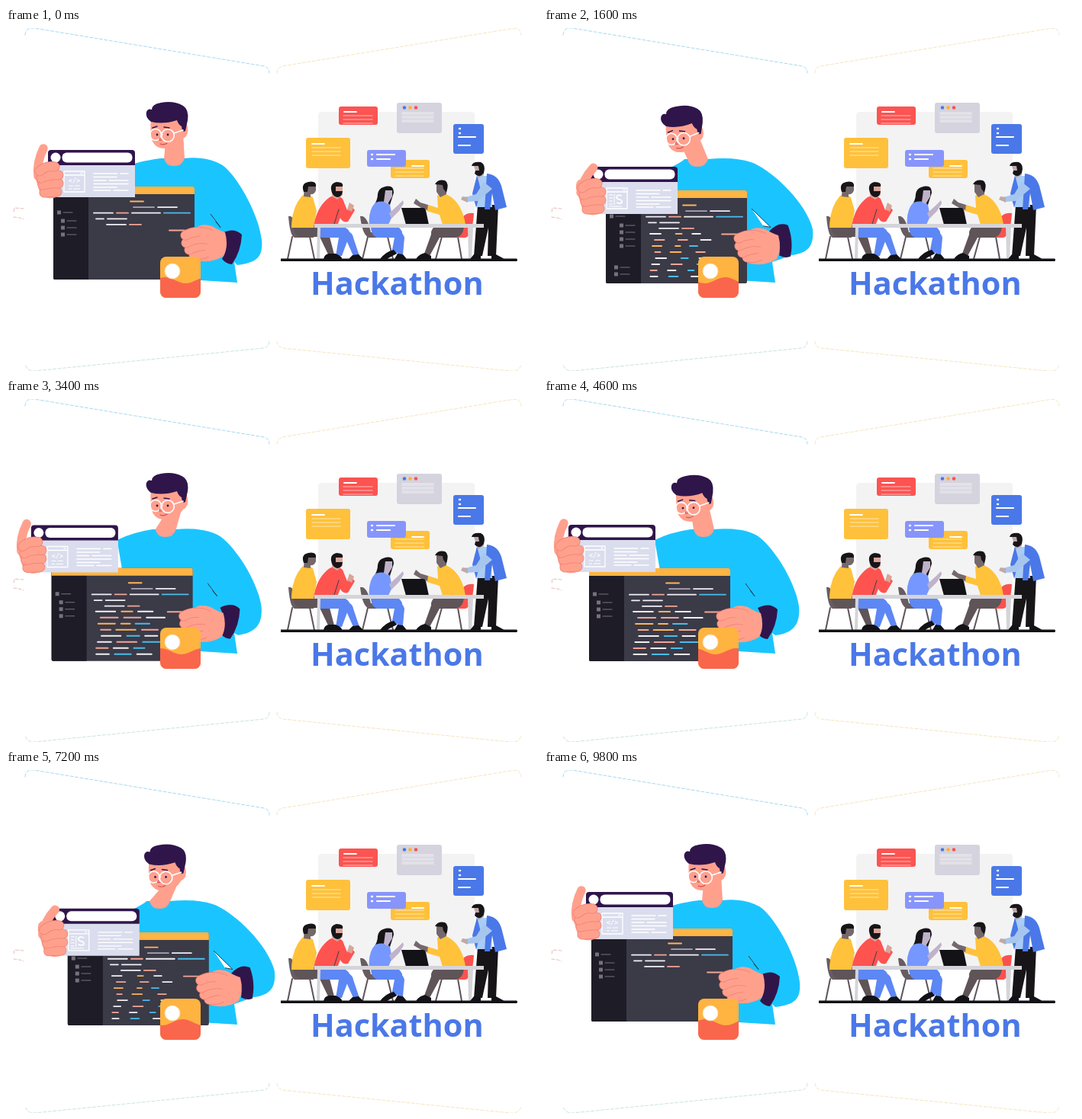
Write an HTML page that moves like this. It is 697 px wide and 450 px high and loops after 9860 ms.

```html
<!DOCTYPE html>
<html lang="en">
<head>
<meta charset="utf-8">
<title>Hackathon</title>
<style>
  html, body { margin: 0; width: 100%; height: 100%; overflow: hidden; background: #fff; }
  svg { display: block; width: 697px; height: 450px; }
  .line { fill: none; stroke-linecap: round; stroke-linejoin: round; }
  .skin { fill: #ffa08d; }
  .ink { fill: #30154b; }
  .finger { stroke: #ffa08d; stroke-width: 11.5; }
  .edge { stroke: #ed7f70; stroke-width: 13; }
</style>
</head>
<body>
<svg viewBox="0 0 697 450">
  <g class="line" stroke-width=".8" stroke-dasharray="4 2.5">
    <path stroke="#8fd0ec" d="M25 9Q26-1 36 0L338 50Q345 52 345 59"/>
    <path stroke="#bcdcd8" d="M345 411Q345 419 337 420L37 450Q27 450 25 441"/>
    <path stroke="#f2dfae" d="M355 59Q355 52 362 50L661 1Q674-2 675 9M355 411Q355 418 363 420L661 450Q673 451 675 441"/>
    <path stroke="#e3aaa8" d="M23 237L11 236 10 243M10 248L18 249 23 251"/>
  </g>

  <g id="man">
    <path id="body" fill="#1ac5ff"/>
    <path id="crease" fill="#fff" stroke="#173a55" stroke-linejoin="round"/>
    <path id="neck" class="skin"/>
    <g id="head">
      <path class="skin" d="M190 118Q188 138 192 149Q197 159 210 158Q225 157 232 145Q240 141 238 130L232 114Z"/>
      <path class="ink" d="M190 123Q182 117 184 110Q186 105 191 107Q191 100 203 98Q220 95 232 102Q240 107 238 121L235 135Q231 138 230 129Q226 127 224 121Q206 127 190 123Z"/>
      <path class="line" stroke="#30154b" stroke-width="1.5" d="M192 131l6-2M207 130l7 1"/>
      <g class="line" stroke="#fff" stroke-width="1.6">
        <circle cx="196" cy="140" r="7.5"/><circle cx="212" cy="141" r="8.3"/>
        <path d="M203 140h2M220 138L232 134"/>
      </g>
      <circle class="ink" cx="198" cy="140" r="1.4"/><circle class="ink" cx="212" cy="140" r="1.4"/>
      <path class="line" stroke="#d44f55" stroke-width="1.2" d="M202 144l-1 3 3 0M202 152q5 2 9-1"/>
    </g>

    <g id="editor">
      <rect width="185" height="122" rx="2" fill="#3b3a47"/>
      <path fill="#1e1c26" d="M0 0H46V122H2Q0 122 0 120Z"/>
      <path fill="#ffb443" d="M0 10V2Q0 0 2 0H183Q185 0 185 2V10Z"/>
      <g id="files"></g>
      <g id="tree"></g>
      <g id="code"></g>
    </g>

    <path id="cuff" class="ink" d="M283 269Q299 261 309 271Q308 293 296 310Q289 310 283 303Q293 288 283 269Z"/>
    <g id="hand">
      <path class="skin" d="M246 264Q256 255 270 260Q280 266 287 268Q292 286 285 299Q270 309 250 305Q238 300 238 284Z"/>
      <g id="rightFingers" class="line"></g>
    </g>

    <clipPath id="tile"><rect x="202" y="300" width="53" height="54" rx="8"/></clipPath>
    <g clip-path="url(#tile)">
      <rect x="202" y="300" width="53" height="54" fill="#ffb340"/>
      <path id="hill" fill="#f9664c"/>
      <circle cx="218" cy="319" r="10" fill="#fff" stroke="#f7ddb0"/>
    </g>

    <g id="card">
      <path fill="#dadded" d="M0 15H114V62H4Z"/>
      <path class="ink" d="M0 20V4Q0 0 4 0H110Q114 0 114 4V20Z"/>
      <circle cx="10" cy="10" r="6.5" fill="#fff"/>
      <rect x="18.5" y="3.5" width="92" height="13" rx="6" fill="#fff"/>
      <g class="line" stroke="#fff" stroke-width="1.3">
        <path d="M21 28H48V55H21ZM21 33H48M43 30.5h2"/>
        <path d="M60 31H91M95 31H105M60 35.5H90M60 40H76M80 40H105M60 44.5H105M60 49H90M60 53H82M86 53H105"/>
      </g>
      <g id="tag">
        <text x="34.5" y="43" text-anchor="middle" font-family="'DejaVu Sans Mono', monospace" font-size="8.5" font-weight="700" fill="#fff">&lt;/&gt;</text>
        <path stroke="#fff" d="M27 47h6M35 47h7M27 51h4M33 51h9"/>
      </g>
      <g id="alt" fill="none" stroke="#fff">
        <path d="M24 37h5M24 41h5M24 45h5M24 49h5M24 52h17M31 36v14"/>
        <path stroke-width="1.8" d="M41 38q-7-2-7 2q0 2 4 3q4 1 3 4q-2 2-7 0"/>
      </g>
      <path id="index" class="line finger" d="M-13 34Q-15 16 -6-2"/>
      <path class="skin" d="M-19 29Q-20 17-12 16L5 24 14 61Q-1 67-10 58Z"/>
      <g id="leftFingers" class="line"></g>
    </g>
  </g>

  <g id="team">
    <path fill="#f3f3f4" d="M414 110H610Q614 110 614 114V257H409V115Q409 110 414 110Z"/>
    <g id="notes"></g>
    <!-- chairs -->
    <path class="line" stroke="#5e545a" stroke-width="2" d="M375 274L369 303M398 274L404 303M474 274L467 303M500 274L507 303M571 274L563 303M592 274L597 303"/>
    <path fill="#675c62" d="M370 247Q378 245 381 268H403V275H378Q372 273 370 247ZM464 247Q473 245 478 268H501V275H476Q467 273 464 247Z"/>
    <path fill="#f9524e" d="M613 243Q598 241 593 259L571 270V275H602Q611 273 613 243Z"/>
    <!-- seated left, yellow -->
    <path fill="#5f5458" d="M377 259H408Q422 263 424 274L430 297 423 299 411 274H385Q376 271 377 259Z"/>
    <path fill="#ffc23a" d="M388 220Q394 217 402 222L407 240 403 262H374Q374 236 388 220Z"/>
    <path fill="#75686a" d="M391 205H406V213Q404 219 399 218V222L390 221Z"/>
    <path fill="#171518" d="M390 215Q386 204 396 202Q407 200 406 208H396L395 215Z"/>
    <!-- seated left, red -->
    <path fill="#5d87f4" d="M408 260H440Q452 264 450 272L440 299H432L436 275H412ZM436 262Q454 266 455 275L463 299H455L444 274Z"/>
    <path fill="#ff5350" d="M424 222Q433 217 441 224L447 239 452 233 457 239 448 254Q441 256 438 249L433 262H403Q406 235 424 222Z"/>
    <path fill="#d9a49a" d="M428 207H441V219L434 225 427 221ZM447 238L450 229 456 233 453 241Z"/>
    <path fill="#171518" d="M427 216Q423 204 433 202Q443 202 441 208H432L432 214H441Q440 222 434 222Q429 221 427 216Z"/>
    <path class="line" stroke="#413b48" d="M436 238L430 257"/>
    <!-- seated woman -->
    <path fill="#5d87f4" d="M478 258H508Q521 263 519 273L512 296H505L509 275H486Q477 271 478 258ZM502 262Q521 266 522 275L520 297H513L511 273Z"/>
    <path fill="#171518" d="M494 209Q508 204 508 216L503 232Q495 239 481 234Q487 226 487 218Q488 211 494 209Z"/>
    <path fill="#7597ff" d="M484 229Q497 225 503 232L506 247 500 260H476Q474 239 484 229Z"/>
    <path fill="#bfb2c9" d="M497 213H506V221L503 226 500 231 495 228ZM502 243L513 233 520 226 521 230 515 240 505 250Z"/>
    <!-- seated right, yellow -->
    <path fill="#5f5458" d="M600 258H566Q556 262 557 271L548 296 555 299 568 275H590Q600 272 600 258Z"/>
    <path fill="#ffc23a" d="M565 220Q574 215 582 221Q598 232 602 258H572L568 245 551 240 553 232 566 236Z"/>
    <path fill="#75686d" d="M564 205H577V218L569 222 564 215ZM553 232L543 229 537 224 534 230 544 236 552 239Z"/>
    <path fill="#171518" d="M562 205Q566 198 575 200Q581 203 577 216L573 211 572 206Z"/>
    <!-- standing -->
    <path fill="#171518" d="M618 232H645L642 299H631L632 262 624 299H613Z"/>
    <path fill="#a9cdf5" d="M617 194H634L637 235H617Z"/>
    <path fill="#4a78e8" d="M630 191Q644 192 649 207L656 235 641 239 637 217 634 238H627ZM617 193L611 217 616 236 622 212Z"/>
    <path fill="#a7c6ee" d="M626 202L637 211 618 227 604 228 602 222 616 218Z"/>
    <path fill="#bfa9a8" d="M613 181H626V193L618 197ZM605 222L598 221 596 225 605 229Z"/>
    <path fill="#171518" d="M610 181Q611 175 622 176Q629 179 626 190Q620 198 614 191L615 187 620 187 619 181Z"/>
    <!-- table, laptop, floor -->
    <path fill="#131216" d="M518 236H547Q549 236 550 239L554 258H524Z"/>
    <path fill="#d5d4d9" d="M404 257H626V262H612L610 303H606L605 262H412L411 303H407L408 262H404Z"/>
    <path fill="#131216" d="M360 302.5H669Q671 304 669 306H360ZM416 303Q417 297 423 296H432Q441 300 440 303ZM449 303L454 298 462 297 468 303ZM490 303Q498 293 508 291L512 296 499 303ZM509 303L513 296 520 297 525 303ZM537 303Q542 296 549 295L557 299V303ZM608 303L613 297H622V303ZM636 303V297L640 296 653 303Z"/>
    <text x="399" y="350" font-family="'Open Sans', 'Noto Sans', sans-serif" font-weight="700" font-size="41.4" fill="#4a78e8">Hackathon</text>
  </g>
</svg>
<script>
const LOOP = 9860;
const $ = id => document.getElementById(id);
const dash = (x, y, w, color, size = 1.8) =>
  `<path class="line" stroke="${color}" stroke-width="${size}" d="M${x} ${y}h${w}"/>`;

// Floating notes
const note = (x, y, w, h, fill) => `<rect x="${x}" y="${y}" width="${w}" height="${h}" rx="3" fill="${fill}"/>`;
const soft = (x, y, w) => [0, 5, 10].map(d => dash(x, y + d, w, '#fff9', 1.2)).join('');
const bullets = (x, y, w) => [0, 6].map(d => dash(x, y + d, 1, '#fff', 2.4) + dash(x + 7, y + d, w - d, '#fff', 2.2)).join('');
$('notes').innerHTML =
  note(436, 103, 51, 24, '#fb5452') + dash(443, 110, 16, '#fff') + soft(442, 115, 38) +
  note(512, 98, 59, 40, '#d5d3de') + soft(519, 111, 41) + soft(519, 113, 41) +
  ['#4a78e8', '#ffb02e', '#f9524e'].map((c, i) => `<circle cx="${522 + i * 7.5}" cy="104.5" r="2.3" fill="${c}"/>`).join('') +
  note(586, 126, 40, 39, '#4a78e8') + dash(594, 132, 1, '#fff', 2.4) + dash(594, 138, 1, '#fff', 2.4) +
  dash(593, 143, 22, '#fff', 2.2) + dash(593, 154, 15, '#fff', 2.2) +
  note(393, 144, 58, 40, '#ffc13b') + dash(401, 152, 16, '#fff') + soft(401, 157, 37) +
  note(504, 173, 51, 24, '#ffc13b') + dash(532, 181, 15, '#fff') + soft(510, 184, 37) +
  note(473, 160, 51, 22, '#8795fb') + bullets(479, 166, 23);

// Code: fixed opening lines, then seeded ones that get typed
const INK = { w: '#f1f0f5', o: '#ffb45a', p: '#f2a696', b: '#49bdec', l: '#aaa5b8' };
const opening = ['101 o17', '105 l27 w25', '53 w25 p15 w37 b34', '56 w10 w25', '70 w25 p15', '152 p20'];
const parse = (row, y) => {
  const [start, ...words] = row.split(' ');
  let x = +start;
  return words.map(s => {
    const w = +s.slice(1), seg = { x, y, w, color: INK[s[0]] };
    x += w + 5;
    return seg;
  });
};
let seed = 7;
const rand = () => (seed = seed * 16807 % 2147483647) / 2147483647;
const typed = [];
for (let y = 57; y < 116; y += 8) {
  let x = 58 + 8 * rand();
  for (let n = 0; n < 3 && x < 130; n++) {
    const w = 12 + 17 * rand();
    typed.push({ x, y, w, color: INK['wwwpob'[Math.floor(6 * rand())]] });
    x += w + 6;
  }
}
const segs = [...opening.flatMap((row, i) => parse(row, 19.5 + i * 7.6)), ...typed];
$('code').innerHTML = segs.map(s => dash(s.x, s.y, s.w, s.color)).join('');
const typedPaths = [...$('code').children].slice(-typed.length);

const file = (x, y) => `<rect x="${x}" y="${y - 2.5}" width="5" height="5" fill="#77717f"/>` + dash(x + 8, y, 12, '#77717f', 1.1);
const column = (x, y, n) => Array.from({ length: n }, (_, i) => file(x, y + i * 9)).join('');
$('files').innerHTML = file(5, 34) + column(10, 45, 3);
$('tree').innerHTML = file(5, 34) + column(18, 46, 4) + column(11, 101, 2);

const fingers = list => list.map(d => ['edge', 'finger'].map(c => `<path class="${c}" d="${d}"/>`).join('')).join('');
$('rightFingers').innerHTML = fingers(['M264 294Q255 299 246 297', 'M265 285Q248 286 240 291', 'M263 277Q248 275 236 282', 'M266 270Q249 264 235 272']) +
  '<path class="finger" style="stroke-width:18" d="M264 273L277 279 270 292"/>';
$('leftFingers').innerHTML = fingers(['M-5 56L12 55', 'M-7 46Q3 43 14 44', 'M-9 37Q1 32 14 33', 'M-11 28Q-2 20 9 22']);

const A = { card: [55, 160], editor: [62, 208], hand: [0, 0], cuff: [0, 0, 0], index: [0], neck: [233, 171],
  left: [150], shoulder: [282, 179], elbow: [335, 278], wrist: [303, 311], crease: [268, 244, 13, 0] };
const B = { card: [61, 182], editor: [81, 213], hand: [20, 4], cuff: [18, -8, -23], index: [16], neck: [214, 172],
  left: [162], shoulder: [271, 176], elbow: [352, 264], wrist: [325, 298], crease: [272, 237, 25, 8] };
const C = { card: [32, 165], editor: [59, 222], hand: [-3, 13], cuff: [-3, 5, 0], index: [0], neck: [222, 171],
  left: [145], shoulder: [277, 178], elbow: [334, 272], wrist: [303, 310], crease: [264, 242, 12, 0] };
const moves = [[60, 950, A, B], [2550, 3500, B, C], [6300, 7250, C, B], [9050, 9780, B, A]];

const ease = x => { x = Math.min(1, Math.max(0, x)); return x * x * (3 - 2 * x); };
const ramp = (t, a, b) => ease((t - a) / (b - a));
const pulse = (t, a, b, c, d) => ramp(t, a, b) - ramp(t, c, d);
const poseAt = t => {
  const [t0, t1, from, to] = moves.filter(m => m[0] <= t).pop() || moves[0];
  const k = ramp(t, t0, t1), pose = {};
  for (const part in from) pose[part] = from[part].map((v, i) => v + (to[part][i] - v) * k);
  return pose;
};
const move = (id, [x, y], more = '') => $(id).setAttribute('transform', `translate(${x} ${y})${more}`);
const show = (id, on) => $(id).style.display = on ? '' : 'none';

function drawBody({ left: [lx], neck: [nx, ny], shoulder: [sx, sy], elbow: [ex, ey], wrist: [wx, wy], crease: [cx, cy, len, gap] }) {
  const dx = ex - sx, dy = ey - sy;
  $('body').setAttribute('d',
    `M${lx} 185Q${lx + 20} 175 ${nx - 30} ${ny}H${nx}Q${sx - 20} ${ny - 3} ${sx} ${sy}` +
    `C${sx + dx * .32} ${sy + dy * .1} ${ex - dx * .1} ${ey - dy * .4} ${ex} ${ey}` +
    `C${ex + 2} ${ey + 22} ${ex - 6} ${wy - 3} ${wx} ${wy}L299 307 303 334 255 331 165 300Z`);
  $('crease').setAttribute('d', `M${cx} ${cy}L${cx + len} ${cy + len * .97 + 5 - gap * .6}L${cx + len / 2 + gap / 3} ${cy + len * .75 + gap / 2}`);
}

function draw(t) {
  const p = poseAt(t);
  const down = pulse(t, 60, 950, 2560, 3000) + pulse(t, 4200, 4950, 5250, 5950) + pulse(t, 7060, 7850, 9050, 9780);
  const hx = -29 * down, hy = 5 * down;
  move('card', p.card);
  move('editor', p.editor);
  move('hand', p.hand);
  move('cuff', p.cuff, `rotate(${p.cuff[2]} 295 287)`);
  move('head', [hx, hy], `rotate(${-3.4 * down} 208 140)`);
  move('index', [0, 0], `rotate(${p.index[0]} -13 34)`);
  drawBody(p);

  const [nx, ny] = p.neck;
  $('neck').setAttribute('d', `M${209 + hx} ${150 + hy}L${232 + hx} ${138 + hy} ${nx + 1} ${ny}` +
    `Q${nx - 2} ${ny + 10} ${nx - 13} ${ny + 10}T${nx - 26} ${ny}Z`);

  const k = pulse(t, 60, 800, 9050, 9600) * (.72 + .26 * Math.sin((t - 2530) * Math.PI / 3000));
  typedPaths.forEach((el, i) => {
    const s = typed[i];
    el.setAttribute('d', `M${s.x} ${s.y}h${s.w * k}`);
    el.style.visibility = k > .02 ? 'visible' : 'hidden';
  });

  const alt = t > 1500 && t < 3200 || t > 5400 && t < 9150;
  const open = t > 1500 && t < 3100;
  show('tag', !alt);
  show('alt', alt);
  show('tree', open);
  show('files', !open);

  let d = 'M202 354';
  for (let x = 202; x <= 256; x += 3)
    d += `L${x} ${331 - 4 * Math.sin((x - 236) / 8.6 + t / LOOP * 18 * Math.PI - 1.5)}`;
  $('hill').setAttribute('d', d + 'V354Z');
}

function tick() {
  draw(performance.now() % LOOP);
  requestAnimationFrame(tick);
}
tick();
</script>
</body>
</html>
```
